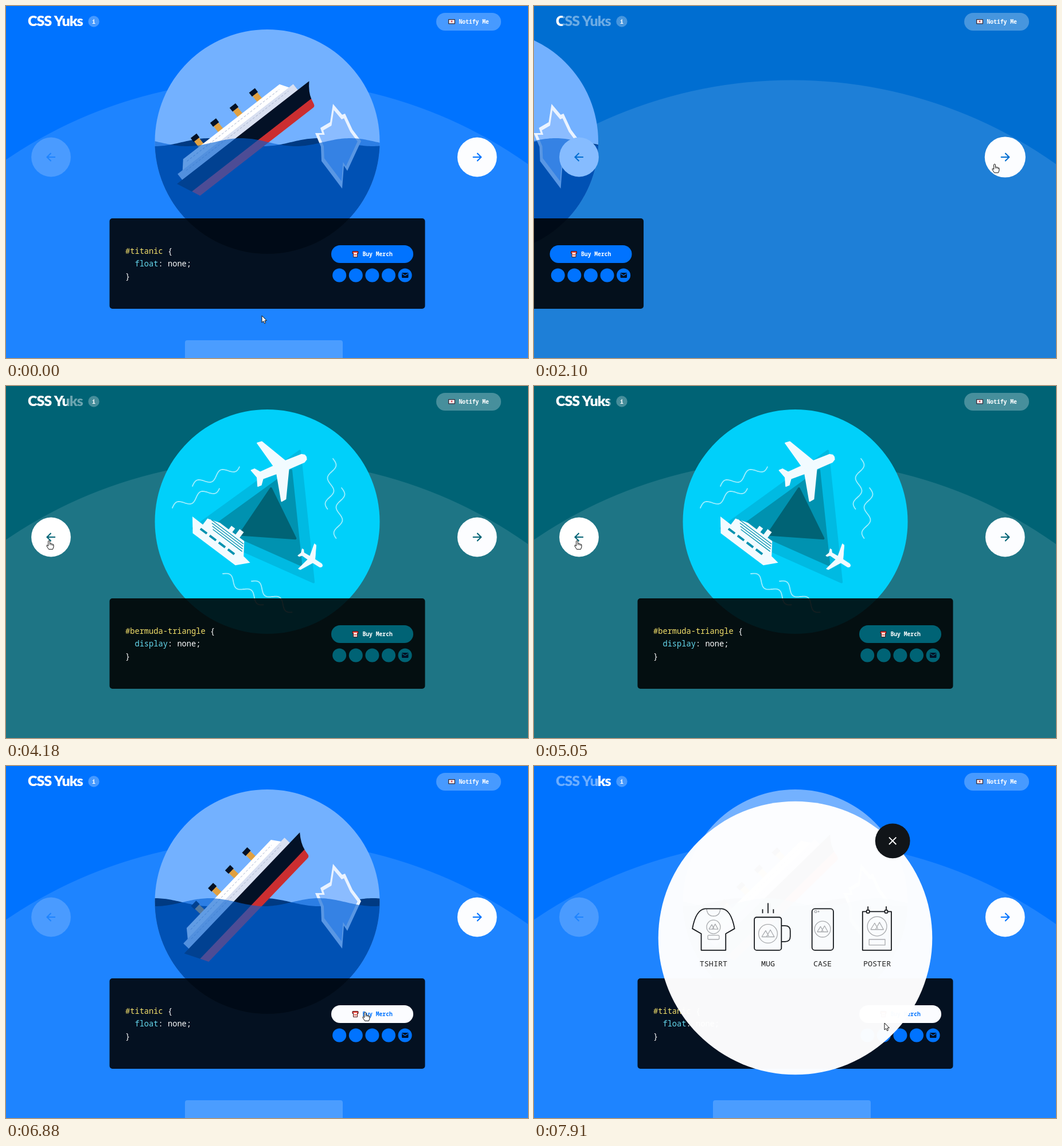
Write an HTML page with a canvas that moves like this. It is 910 px wide and 615 px high and loops after 8000 ms.

```html
<!DOCTYPE html>
<html lang="en">
<head>
<meta charset="utf-8">
<title>CSS Yuks</title>
<style>
  html, body { margin: 0; width: 100%; height: 100%; overflow: hidden; background: #0073ff; }
  canvas { display: block; width: 910px; height: 615px; }
</style>
</head>
<body>
<canvas id="stage" width="910" height="615"></canvas>
<script>
const ctx = document.getElementById('stage').getContext('2d');
const LOOP = 8000, TAU = Math.PI * 2, STEP = 1365;
const MONO = '"Noto Sans Mono", "DejaVu Sans Mono", monospace';
const BLUE = [0, 115, 255], TEAL = [0, 99, 117], WHITE = [255, 255, 255];
const NIGHT = '#031126', INK = '#15181c', GREY = '#a9abae', PALE = '#f2fbff';

// pointer stops: arrival, departure, x, y
const STOPS = [
  [0, 0, 446, 541], [700, 860, 450, 577], [1000, 1000, 762, 406],
  [1590, 3100, 803, 276], [3940, 3940, 579, 372], [4170, 5180, 75, 270],
  [5350, 5350, 70, 290], [5690, 5690, 62, 402], [5990, 6200, 240, 600],
  [6860, 7780, 626, 430], [7910, LOOP, 611, 449]
];

const clamp = v => Math.max(0, Math.min(1, v));
const lerp = (a, b, p) => a + (b - a) * p;
const mix = (a, b, p) => a.map((v, i) => lerp(v, b[i], p));
const rgb = c => `rgb(${c.map(Math.round).join(',')})`;
const white = a => `rgba(255,255,255,${a})`;
const smooth = p => p * p * (3 - 2 * p);

// cubic-bezier(.25, .1, .25, 1)
function ease(p) {
  if (p <= 0 || p >= 1) return clamp(p);
  let lo = 0, hi = 1, u = .5;
  for (let i = 0; i < 20; i++) {
    u = (lo + hi) / 2;
    const x = .75 * u * (1 - u) + u ** 3;
    if (x < p) lo = u; else hi = u;
  }
  return .3 * u * (1 - u) ** 2 + 3 * u * u * (1 - u) + u ** 3;
}

function fill(color, path) {
  ctx.fillStyle = color;
  ctx.fill(path);
}
function line(color, width, path) {
  ctx.strokeStyle = color;
  ctx.lineWidth = width;
  ctx.stroke(path);
}
function rounded(color, path, width = 2) {
  fill(color, path);
  line(color, width, path);
}
function disc(x, y, r) {
  const p = new Path2D();
  p.arc(x, y, r, 0, TAU);
  return p;
}
function box(x, y, w, h, r = 0) {
  const p = new Path2D();
  p.roundRect(x, y, w, h, r);
  return p;
}
const path = s => new Path2D(s);
const poly = s => path('M' + s + 'Z');

function text(s, x, y, size, color, weight = 400, family = MONO) {
  ctx.font = `${weight} ${size}px ${family}`;
  ctx.fillStyle = color;
  ctx.fillText(s, x, y);
}
function group(draw) {
  ctx.save();
  draw();
  ctx.restore();
}
function at(x, y, degrees, scale, draw) {
  group(() => {
    ctx.translate(x, y);
    ctx.rotate(degrees * Math.PI / 180);
    ctx.scale(scale, scale);
    draw();
  });
}

/* ---------- ship scene ---------- */
const HULL = path('M-141 -12.5H151Q138 2 135 14.5H-128.5Z');
const KEEL = path('M-128.5 14H135L133 24Q132 28.5 128 28.5H-122Z');
const CABIN = poly('-106 -40 107 -40 117 -25 -119 -25');
const BERG = poly('570 171 586 190 591 188 604 216 619 236 595 288 589 279 586 319 550 271 549 246 539 222 551 222 548 213 565 203');

function sea(crest) {
  const p = new Path2D();
  for (let x = 255; x <= 657; x += 3) p.lineTo(x, 238 - 7 * Math.cos((x - crest) * TAU / 190));
  p.lineTo(657, 440);
  p.lineTo(255, 440);
  return p;
}
function liner() {
  for (let x = -73; x < 60; x += 43) {
    fill('#e0a040', box(x + 1.2, -54, 10.6, 16));
    fill(NIGHT, box(x, -61, 13, 8.5));
  }
  fill('#fff', CABIN);
  fill('#d9e0f1', box(-129.5, -25.5, 255.5, 14));
  fill(NIGHT, HULL);
  fill('#cb2e30', KEEL);
  ctx.setLineDash([4, 3]);
  line('#a4b0cc', .9, path('M-103 -33H101M-114 -21H112'));
}
function shipScene(t) {
  const sway = Math.cos(t * TAU / 2700);
  const tilt = 41.3 - 5.3 * Math.cos((t - 1400) * TAU / 10000);
  const porthole = disc(455.5, 237, 196);
  fill('#73b1ff', porthole);
  group(() => {
    ctx.clip(porthole);
    fill('#003a82', sea(403 - 49 * sway));
    at(417, 234, -tilt, 1, liner);
    fill('#eaf3ff', BERG);
    at(580, 240, 0, .84, () => {
      ctx.translate(-580, -240);
      fill('#8bbcff', BERG);
    });
    fill('rgba(0,95,212,.62)', sea(382 + 28 * sway));
  });
}

/* ---------- triangle scene ---------- */
const HALF_JET = poly('0 0 -1 -4 -6 -7 -36 -7.5 -61 -54 -69 -55 -58 -7 -84 -6 -91 -15 -97 -15 -92 0');

function jet() {
  for (const side of [1, -1]) {
    ctx.scale(1, side);
    rounded(PALE, HALF_JET);
  }
}
function cruiser() {
  fill(PALE, poly('0 0 115 2 129 4 111 23 18 23'));
  fill(PALE, poly('23 3 23 -13 45 -20 98 -20 114 3'));
  fill(PALE, box(64, -28, 8, 12));
  fill(PALE, box(79, -32, 9, 14));
  for (let y = -16; y < 0; y += 4) fill('#0092b0', box(46 + y, y, 62 - y / 2, 1.3));
  for (let x = 24; x < 100; x += 20) fill('#0092b0', box(x, 6.6, 14, 4));
}
function triangle(r, degrees) {
  const p = new Path2D();
  for (let i = 0; i < 3; i++) {
    const a = degrees * Math.PI / 180 + i * TAU / 3;
    p.lineTo(458 + r * Math.cos(a), 235 + r * Math.sin(a));
  }
  p.closePath();
  return p;
}
function squiggle(x, y, dx, dy) {
  const p = new Path2D(), len = Math.hypot(dx, dy);
  for (let u = 0; u <= 1; u += 1 / 48) {
    const a = 6.5 * Math.sin(u * TAU * 2) / len;
    p.lineTo(x + dx * u + dy * a, y + dy * u - dx * a);
  }
  line(white(.62), 1.8, p);
}
function currents(x, y, dx, dy, gapX, gapY) {
  squiggle(x, y, dx, dy);
  squiggle(x + gapX, y + gapY, dx, dy);
}
function triangleScene() {
  fill('#00d0fa', disc(455.5, 237, 196));
  group(() => {
    ctx.lineJoin = ctx.lineCap = 'round';
    currents(325, 175, 83, -36, -35, 38);
    currents(570, 127, -8, 90, 15, 51);
    currents(378, 328, 73, 54, 50, 13);
    rounded('#00bae2', triangle(133, -66), 4);
    rounded('#0092b0', triangle(96, -66), 4);
    rounded('#006375', triangle(56, -86), 4);
    at(523, 124, -22.6, 1, jet);
    at(551, 315, 32.7, .47, jet);
    at(325, 228, 37, 1, cruiser);
  });
}

/* ---------- code card ---------- */
function shirtIcon(x, y) {
  const dark = '#4a1518', red = '#e8473f';
  fill(dark, box(x, y, 11, 5, 1.5));
  fill(dark, box(x + 1.5, y + 3, 8, 8, 1));
  fill(red, box(x + 1, y + 1, 9, 3, 1));
  fill('#ffe6df', box(x + 2.5, y + 3, 6, 7));
  fill(red, box(x + 3, y + 6, 5, 1.5));
}
function card(theme, name, prop, hover) {
  const color = rgb(theme), size = 13.7, em = size * .6;
  fill('rgba(0,0,0,.87)', box(180.5, 371, 550, 158, 5));
  text(name, 208, 433, size, '#f3e06b');
  text('{', 208 + em * (name.length + 1), 433, size, '#fff');
  text(prop, 208 + em * 2, 455, size, '#66d9ef');
  text(': none;', 208 + em * (prop.length + 2), 455, size, '#fff');
  text('}', 208, 477, size, '#fff');

  fill(rgb(mix(theme, [251, 252, 255], hover)), box(567, 418, 143, 31, 15.5));
  shirtIcon(603.5, 428);
  text('Buy Merch', 621.5, 437, 9.7, rgb(mix(WHITE, theme, hover)), 600);
  for (let i = 0; i < 5; i++) fill(color, disc(581.2 + i * 28.6, 470.5, 12));
  fill(NIGHT, box(690, 466, 11.5, 9, 1.2));
  line(color, 1.2, path('M690.5 467.5L695.7 471L701 467.5'));
}

/* ---------- page chrome ---------- */
function title(t) {
  const draw = color => {
    ctx.letterSpacing = '-1px';
    text('CSS Yuks', 38, 35, 25, color, 900, 'Lato, sans-serif');
    ctx.letterSpacing = '0px';
  };
  const lit = (from, to) => group(() => {
    ctx.clip(box(from, 8, Math.max(0, to - from), 36));
    draw('#fff');
  });
  // every cycle wipes the letters out, then slowly writes them back
  const cycle = (t + 5300) % 6180;
  draw(white(.42));
  if (t < 880) lit(30, 160);
  else if (cycle < 1125) lit(39 + cycle * .0835, 160);
  else lit(30, 50 + (cycle - 1220) * .0275);
}
function header(t) {
  title(t);
  fill(white(.28), disc(153, 27, 9.7));
  text('i', 150, 30.5, 10, '#fff', 700);
  fill(white(.28), box(750, 12, 113, 31, 15.5));
  fill('#2b2233', box(771, 23, 12, 8.5, 1));
  fill('#f6ecef', box(772.2, 24.2, 9.6, 6.1));
  fill('#d9474f', disc(777, 27, 1.4));
  text('Notify Me', 789.5, 30.5, 9.7, '#fff', 600);
}
function arrowButton(x, dir, face, color, since) {
  const pulse = since > 0 && since < 400 ? 1.2 * Math.sin(since * TAU / 400) : 0;
  at(x, 264, 0, 1, () => {
    fill(face, disc(0, 0, 34.4 + pulse));
    ctx.scale(dir, 1);
    line(color, 2.1, path('M-7.5 0H6.5M0 -7L7 0L0 7'));
  });
}

/* ---------- merch dialog ---------- */
const dark = p => line(INK, 1.8, p);
const soft = p => line(GREY, 1.3, p);

function badge(y, r) {
  soft(disc(0, y, r));
  at(0, y, 0, r / 12, () => line(GREY, 15.6 / r, path('M-8 4L-3 -4L1 3M-2 4L3 -5L8 4ZM-8 4H8')));
}
function tshirt() {
  soft(path('M-12 -37Q-11 -24 0 -24Q11 -24 12 -37'));
  dark(path('M-15 -37H15Q31 -35 37 -2L21.5 7V36H-21.5V7L-37 -2Q-31 -35 -15 -37Z'));
  badge(-5, 12);
  soft(box(-10, 9.5, 20, 7.5, 2));
}
function mug() {
  dark(box(-24, -22, 47.5, 58, 4));
  dark(path('M23.5 -7H30Q39 -7 39 2V12Q39 21 30 21H23.5'));
  dark(path('M-9.5 -36V-29M0 -47V-29M9.5 -36V-29'));
  badge(7, 16.5);
}
function phone() {
  dark(box(-18.5, -37, 37.5, 73, 5));
  badge(-1, 14);
  soft(disc(-12, -32, 2));
  soft(disc(-7, -32, .8));
}
function poster() {
  dark(box(-25.5, -32, 50.5, 68));
  badge(-6, 17);
  soft(box(-14, 17, 28, 10));
  for (const x of [-16, 16]) {
    const clip = box(x - 2.5, -34.5, 5, 5, 1);
    fill('#fff', clip);
    dark(clip);
    dark(path(`M${x} -35V-41`));
  }
}
function dialog(scale) {
  if (scale <= 0) return;
  at(455.5, 300.5, 0, scale, () => {
    ctx.lineJoin = 'round';
    ctx.textAlign = 'center';
    fill(white(.978), disc(0, 0, 240.4));
    Object.entries({ TSHIRT: tshirt, MUG: mug, CASE: phone, POSTER: poster }).forEach(([name, draw], i) => {
      at((i - 1.5) * 95.7, -14.5, 0, 1, () => {
        draw();
        text(name, 0, 64, 13.5, '#222');
      });
    });
    fill('#111519', disc(170.8, -170.8, 30.6));
    at(170.8, -170.8, 45, 1, () => line('#fff', 1.9, path('M-8.8 0H8.8M0 -8.8V8.8')));
  });
}

/* ---------- pointer ---------- */
const ARROW = poly('0 0 0 12 2.8 9.6 4.6 13.6 6.6 12.7 4.9 8.9 8.4 8.6');
const HAND = path('M-1.4 1Q0 -1 1.4 1V5.5Q3 4.5 4 6Q5.5 5.2 6.3 6.7Q8 6.2 8 8V11L6.5 15.3H-.5L-3.8 10Q-4.8 8.2 -3.4 7.8L-1.4 9.5Z');

function pointerAt(t) {
  const i = STOPS.findLastIndex(s => s[0] <= t);
  const [, leave, x, y] = STOPS[i];
  const [arrive, , nx, ny] = STOPS[i + 1] || STOPS[i];
  const p = t > leave ? smooth((t - leave) / (arrive - leave)) : 0;
  return { x: lerp(x, nx, p), y: lerp(y, ny, p) };
}
function pointer({ x, y }, hand) {
  at(x, y, 0, 1, () => {
    ctx.lineJoin = 'round';
    const shape = hand ? HAND : ARROW;
    fill('#fff', shape);
    line('#111', 1, shape);
    if (hand) line('#111', .8, path('M1.4 5.5V8M4 6V8.5M6.3 6.7V9'));
  });
}

function render(t) {
  const next = 2003.4, back = 5082;
  const shift = d => ease((t - next) / d) - ease((t - back) / d);
  const s = shift(400), k = shift(450);
  const bg = mix(BLUE, TEAL, k), color = rgb(bg);
  const open = ease((t - 7420) / 550);
  const hover = clamp((t - 6780) / 100);

  ctx.fillStyle = color;
  ctx.fillRect(0, 0, 910, 615);
  fill(white(.118), disc(449.5, 925.5, 796));
  if (s < .3) fill(white(.2), box(312, 584, 275, 60, 4));

  if (s < 1) at(-STEP * s, 0, 0, 1, () => {
    shipScene(t);
    card(BLUE, '#titanic', 'float', hover);
  });
  if (s > 0) at(STEP * (1 - s), 0, 0, 1, () => {
    triangleScene();
    card(TEAL, '#bermuda-triangle', 'display', 0);
  });

  header(t);
  const hill = mix(bg, WHITE, .118);
  arrowButton(78.5, -1, rgb(mix([74, 155, 255], WHITE, k)), rgb(mix(hill, bg, clamp(k * 3))), t - back);
  arrowButton(821.3, 1, '#fcfdff', color, t - next);
  dialog(open);

  const p = pointerAt(t);
  const over = x => Math.hypot(p.x - x, p.y - 264) < 35;
  const merch = open < .5 && Math.abs(p.x - 638.5) < 71 && Math.abs(p.y - 433.5) < 15;
  pointer(p, over(821) || (over(78) && s > .5) || merch);
}

const start = performance.now();
function tick() {
  render((performance.now() - start) % LOOP);
  requestAnimationFrame(tick);
}
tick();
</script>
</body>
</html>
```
